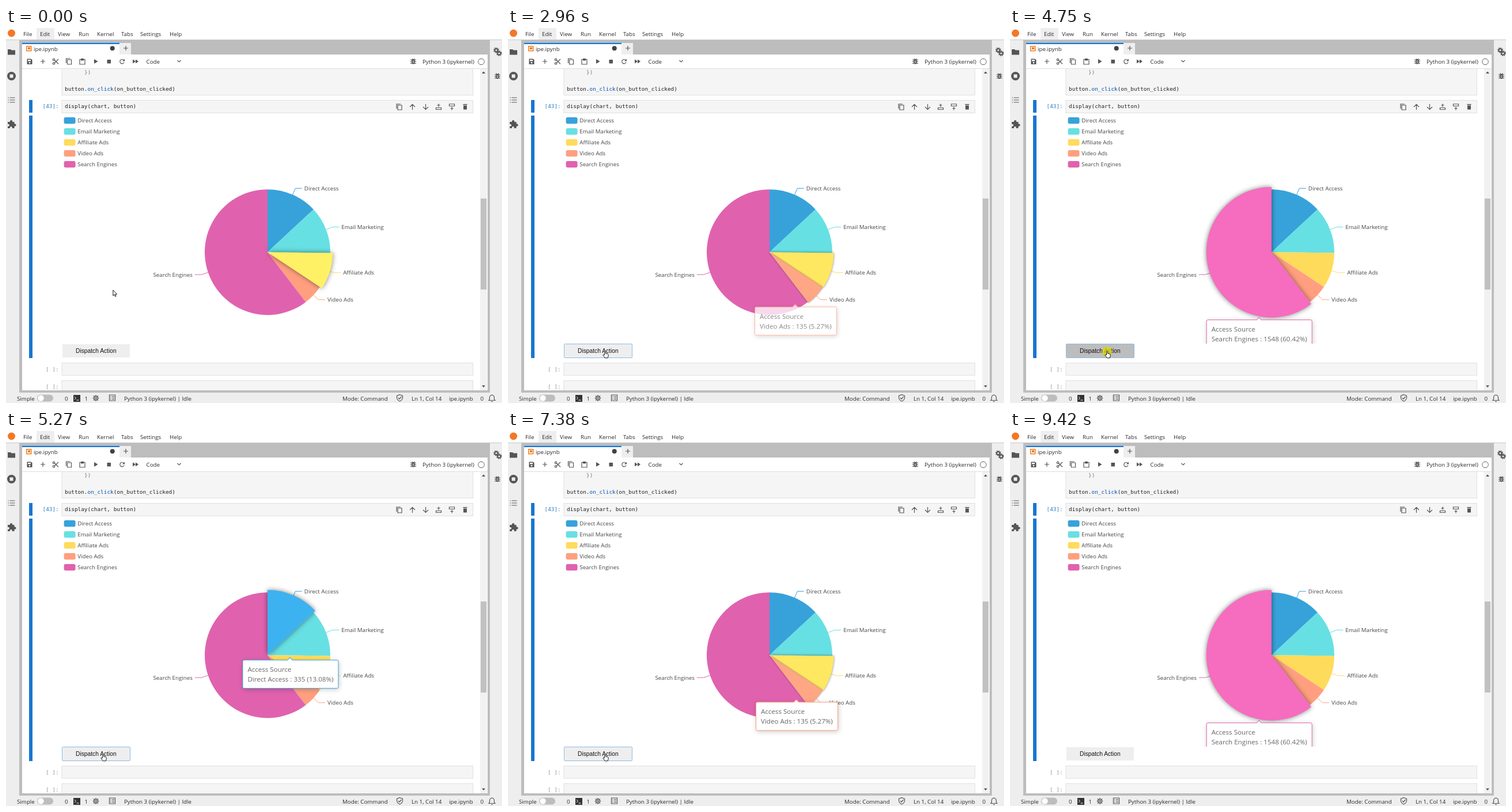
Animation, 861 px wide and 651 px high, one loop 9.52 s. Source, as an HTML page:

```html
<!DOCTYPE html>
<html lang="en">
<head>
<meta charset="utf-8">
<title>Notebook pie chart</title>
<style>
  html, body { margin: 0; width: 100%; height: 100%; overflow: hidden; background: #fff; }
  svg, #chart { position: absolute; left: 0; top: 0; width: 861px; height: 651px; }
  text { font: 9.75px "Open Sans", sans-serif; fill: #2b2b2b; white-space: pre; }
  .code { font: 9.4px "DejaVu Sans Mono", monospace; fill: #212121; }
  .prompt { fill: #307fc1; }
  .empty { fill: #9a9a9a; }
  .cell { fill: #f5f5f5; stroke: #e0e0e0; }
  .line { fill: none; stroke: #555; stroke-width: 1.2; }
  .solid { fill: #555; }
  .label { fill: #464646; }
  #buttonText { font: 10.25px "Liberation Sans", Arial, sans-serif; fill: #111; }
  #chart { clip-path: inset(148px 50px 103px 97px); }
  #tip {
    position: absolute; left: 0; top: 0; box-sizing: border-box; height: 50px; padding: 7px 8px;
    font: 11.6px/17px "Open Sans", sans-serif; color: #666; white-space: pre;
    background: #fff; border: 1px solid; border-radius: 3px; box-shadow: 1px 2px 8px rgba(0,0,0,.2);
  }
  #tip::before {
    content: ""; position: absolute; left: calc(50% - 4px); top: -4px; width: 6px; height: 6px;
    background: #fff; border: solid; border-width: 1px 0 0 1px; border-color: inherit; transform: rotate(45deg);
  }
</style>
</head>
<body>
<svg viewBox="0 0 861 651">
  <defs>
    <g id="bug"><ellipse class="solid" rx="3" ry="4.2"/><path class="line" d="M-5-3H5M-5 0H5M-5 3H5M-2.5-5.2L0-3 2.5-5.2"/><path d="M-1.3-1H1.3M-1.3 1.4H1.3" stroke="#fff"/></g>
    <g id="copy"><path class="line" d="M-4.5 3V-5H2.5M-2.5-3H4.5V5H-2.5Z"/></g>
    <g id="gear"><circle class="line" r="2.6" style="stroke-width:2"/><circle class="line" r="4.1" stroke-dasharray="1.6 1.62" style="stroke-width:1.6"/></g>
    <g id="list"><path class="line" d="M-3-4H6M-3 0H6M-3 4H6M-6-4h1.5M-6 0h1.5M-6 4h1.5"/></g>
    <clipPath id="page"><rect x="28" y="71" width="795" height="558"/></clipPath>
  </defs>

  <!-- window frame -->
  <path fill="#eee" d="M0 20H861V651H0ZM53 0H84V20H53Z"/>
  <path fill="#bdbdbd" d="M23 20H840V633H23Z"/>
  <path fill="#eee" d="M197 26H217V46H197Z"/>
  <path fill="#fff" d="M28 46H836V629H28Z"/>
  <path stroke="#c8c8c8" fill="none" d="M0 20.5H861"/>
  <path fill="#fff" d="M28 25H197V46H28Z"/>
  <path fill="#1976d2" d="M28 25.5H197V28H28Z"/>
  <path stroke="#ddd" d="M28 70.5H836"/>

  <!-- menu and tabs -->
  <circle cx="9.5" cy="9" r="6.5" fill="#f37726"/>
  <text x="30" y="13.5">File</text><text x="59" y="13.5">Edit</text><text x="90" y="13.5">View</text>
  <text x="126" y="13.5">Run</text><text x="158" y="13.5">Kernel</text><text x="200" y="13.5">Tabs</text>
  <text x="233" y="13.5">Settings</text><text x="284" y="13.5">Help</text>
  <rect x="35.7" y="31.7" width="8" height="8" fill="none" stroke="#ef6c00" stroke-width="1.3"/>
  <path fill="#ef6c00" d="M38 33.5H42V38L40 36.3 38 38Z"/>
  <text x="48" y="39.5">ipe.ipynb</text>
  <circle cx="184.7" cy="35.2" r="4" fill="#424242"/>
  <path class="line" d="M204 35H212M208 31V39"/>

  <!-- notebook toolbar -->
  <path class="solid" d="M36.5 53.5H43.5L45.5 55.5V63H36.5Z"/><path fill="#fff" d="M38 55H43V57.5H38Z"/><circle cx="41" cy="60.3" r="1.4" fill="#fff"/>
  <path class="line" d="M60 58H68M64 54V62"/>
  <g class="line"><path d="M84 55.5L91 62.5M84 61L91 54"/><circle cx="83" cy="55" r="1.7"/><circle cx="83" cy="61.5" r="1.7"/></g>
  <use href="#copy" x="109" y="58"/>
  <path class="line" d="M128 54.5H137V63H128Z"/><path class="solid" d="M130 53H135V56.5H130Z"/>
  <path class="solid" d="M153 54L159.5 58 153 62ZM175.5 55H182V61.5H175.5ZM220 54.5L225 58 220 61.5ZM225 54.5L230 58 225 61.5Z"/>
  <path class="line" d="M204.5 56A3.7 3.7 0 1 0 205 59.5"/><path class="solid" d="M206 53.5V57.5H202Z"/>
  <text x="243.5" y="62">Code</text>
  <path class="line" d="M297.5 56L300.5 59 303.5 56"/>
  <use href="#bug" x="707" y="58.5"/>
  <text x="723" y="62">Python 3 (ipykernel)</text>
  <circle id="kernel" cx="825" cy="58.5" r="5.3" fill="none" stroke="#616161"/>

  <!-- side bars -->
  <path class="solid" d="M3 37H8L9.5 38.5H16V46.5H3Z"/>
  <circle class="solid" cx="9.5" cy="83.5" r="7.5"/><path fill="#eee" d="M6.5 80.5H12.5V86.5H6.5Z"/>
  <use href="#list" x="9.5" y="125"/>
  <path class="solid" d="M3 163H7A2.2 2.2 0 1 1 11 163H14.5V166.5A2.2 2.2 0 1 1 14.5 170.5V174H10.5A2 2 0 1 0 7 174H3V170.5A2 2 0 1 0 3 167Z"/>
  <use href="#gear" x="851" y="38.5"/><use href="#gear" x="856" y="44"/>
  <use href="#bug" x="853" y="84"/>

  <!-- cells -->
  <g clip-path="url(#page)">
    <rect class="cell" x="97" y="60.5" width="713.5" height="56"/>
    <text class="code" x="136" y="80.2" style="fill:#777">})</text>
    <text class="code" x="102" y="109">button.<tspan fill="#0550ae">on_click</tspan>(on_button_clicked)</text>
    <path fill="#1976d2" d="M40 125H46V147H40ZM40 152H46V573H40Z"/>
    <text class="code prompt" x="63.5" y="139.2">[43]:</text>
    <rect class="cell" x="97" y="125.5" width="713.5" height="22"/>
    <text class="code" x="102" y="139.2">display(chart, button)</text>
    <text class="code empty" x="69" y="595.5">[ ]:</text>
    <rect class="cell" x="97" y="581.5" width="713.5" height="21.5"/>
    <text class="code empty" x="69" y="626">[ ]:</text>
    <rect class="cell" x="97" y="612" width="713.5" height="22"/>
  </g>
  <use href="#copy" x="682.5" y="137"/>
  <path class="line" d="M705.5 142V132.5M701 137L705.5 132.5 710 137M728.5 132V141.5M724 137L728.5 141.5 733 137"/>
  <path class="line" d="M746.5 138.5H755.5V141.5H746.5ZM751 137V131.5M748.5 134H753.5M769.5 132H778.5V135.5H769.5ZM774 137V142.5M771.5 139.5H776.5"/>
  <path class="solid" d="M793.5 132H800.5V133.5H793.5ZM794 134.5H800V141.5H794Z"/>

  <!-- scroll bar -->
  <path fill="#f1f1f1" d="M823 71H835V629H823Z"/><path fill="#c1c1c1" d="M824 296H834V454H824Z"/>
  <path fill="#505050" d="M826 79L829 75.5 832 79ZM826 620.5L829 624 832 620.5Z"/>

  <!-- status bar -->
  <text x="19" y="646.5">Simple</text>
  <rect x="54" y="636.5" width="28" height="12" rx="6" fill="#bdbdbd"/><circle cx="60.5" cy="642.5" r="5.2" fill="#fff"/>
  <text x="102" y="646.5">0</text>
  <path fill="#333" d="M117 637H129V649H117Z"/><path d="M119 640L121.5 642.5 119 645M122.5 646H126.5" fill="none" stroke="#fff"/>
  <text x="136.5" y="646.5">1</text>
  <g class="line"><circle cx="156" cy="642.5" r="3.6"/><path d="M154.5 641H157.5V644H154.5ZM156 637V639M156 646V648M150.5 642.5H152.5M159.5 642.5H161.5M152 638.5L153.5 640M160 638.5L158.5 640M152 646.5L153.5 645M160 646.5L158.5 645"/>
    <path d="M179.5 637H189.5V647H179.5ZM181 639.5H182.5M184 639.5H188M181 642H182.5M184 642H188M181 644.5H182.5M184 644.5H188"/>
    <path d="M683.5 636.5L688.5 638.5V642Q688 646 683.5 648 679 646 678.5 642V638.5ZM681 642L683 644 686.5 640"/>
    <path d="M838 646.5H849L847.5 644.5V641Q847 637.5 843.5 637 840 637.5 839.5 641V644.5ZM842 648.5H845"/></g>
  <text x="205" y="646.5">Python 3 (ipykernel) | <tspan id="status">Idle</tspan></text>
  <text x="584" y="646.5">Mode: Command</text><text x="704" y="646.5">Ln 1, Col 14</text>
  <text x="769" y="646.5">ipe.ipynb</text><text x="823.5" y="646.5">0</text>

  <rect id="button" x="97.5" y="548.5" width="118" height="24" rx="1"/>
  <text id="buttonText" x="121" y="563.5">Dispatch Action</text>
</svg>

<div id="chart">
  <svg viewBox="0 0 861 651"><g id="labels"></g><g id="pie"></g></svg>
  <div id="tip"></div>
</div>

<svg viewBox="0 0 861 651">
  <circle id="clickMark" cx="168.5" cy="562" r="8.5" fill="#dcd600"/>
  <g id="pointer" fill="#fff" stroke="#000" stroke-width=".9" stroke-linejoin="round">
    <path id="arrow" d="M.5.5V10.2L2.7 8.2 4.2 11.6 5.8 10.9 4.3 7.6H7.3Z"/>
    <path id="hand" d="M3.3 7.8V1.5A1 1 0 0 1 5.3 1.5V5L8.6 5.7Q9.8 6 9.8 7.2V9.5L8.8 12.8H4.2L1 8.7Q.3 7.4 1.5 7Z"/>
  </g>
</svg>

<script>
const LOOP = 9520, CX = 454, CY = 389.2, RADIUS = 109, GROW = 4.2, LEAD = 12;
const slices = [
  { name: 'Direct Access', value: 335, rgb: [55, 162, 218] },
  { name: 'Email Marketing', value: 310, rgb: [103, 224, 227] },
  { name: 'Affiliate Ads', value: 234, rgb: [255, 219, 92] },
  { name: 'Video Ads', value: 135, rgb: [255, 159, 127] },
  { name: 'Search Engines', value: 1548, rgb: [224, 98, 174] },
];
// Each click: press time, reply time, slice that gets highlighted.
const clicks = [
  [2710, 2910, 3], [3700, 3850, 4], [4750, 4900, 0], [5570, 5740, 1],
  [6440, 6600, 2], [7180, 7330, 3], [7700, 7850, 4],
].map(([press, reply, slice]) => ({ press, reply, slice }));
const path = [
  [0, 185.3, 454.5], [590, 185.3, 454.5], [1540, 170.3, 531], [1660, 175.5, 564], [1830, 175.5, 564],
  [1920, 169.5, 563], [2090, 169.5, 563], [2180, 164.3, 560], [8650, 164.3, 560], [9020, 757, 652], [LOOP, 757, 652],
];

const $ = id => document.getElementById(id);
const clamp = x => Math.min(1, Math.max(0, x));
const lerp = (a, b, k) => a + (b - a) * k;
const easeOut = (x, power) => 1 - (1 - clamp(x)) ** power;
const between = (t, from, to) => t >= from && t < to;
const css = (rgb, gain = 1) => `rgb(${rgb.map(c => Math.min(255, c * gain)).join()})`;
const polar = (angle, r) => [CX + r * Math.sin(angle), CY - r * Math.cos(angle)];

function make(parent, tag, attributes, text = '') {
  const node = document.createElementNS('http://www.w3.org/2000/svg', tag);
  for (const key in attributes) node.setAttribute(key, attributes[key]);
  node.textContent = text;
  return parent.appendChild(node);
}

function sector({ start, end }, r) {
  const large = end - start > Math.PI ? 1 : 0;
  return `M${CX} ${CY}L${polar(start, r)}A${r} ${r} 0 ${large} 1 ${polar(end, r)}Z`;
}

function fillTip({ name, value, rgb }) {
  const share = +(100 * value / total).toFixed(2);
  $('tip').textContent = `Access Source\n${name} : ${value} (${share}%)`;
  $('tip').style.borderColor = css(rgb);
}

const total = slices.reduce((sum, s) => sum + s.value, 0);
let turn = 0;
slices.forEach((s, i) => {
  s.start = turn;
  s.end = turn += s.value / total * 2 * Math.PI;
  const color = css(s.rgb), middle = (s.start + s.end) / 2, side = Math.sign(Math.sin(middle));
  const [x, y] = polar(middle, RADIUS + LEAD);

  make($('labels'), 'rect', { x: 100.6, y: 155, width: 20, height: 11.2, rx: 3, fill: color, transform: `translate(0 ${19 * i})` });
  make($('labels'), 'text', { class: 'label', x: 124.3, y: 164 + 19 * i }, s.name);
  make($('labels'), 'path', { d: `M${polar(middle, RADIUS)}L${x} ${y}h${side * 11.5}`, fill: 'none', stroke: color });
  make($('labels'), 'text', {
    class: 'label', x: x + side * 15.5, y: y + 3.4, 'text-anchor': side > 0 ? 'start' : 'end',
  }, s.name);

  s.node = make($('pie'), 'path', { d: sector(s, RADIUS) });
  const box = s.node.getBBox();
  fillTip(s);
  s.tipX = box.x + box.width / 2 - $('tip').offsetWidth / 2;
  s.tipY = box.y + box.height + 8;
});

function drawChart(t) {
  const done = clicks.filter(c => t >= c.reply);
  const order = [2, ...done.map(c => c.slice)];
  const active = slices[order.at(-1)], previous = slices[order.at(-2)];
  const age = done.length ? t - done.at(-1).reply : LOOP;
  const k = easeOut(age / 300, 3);

  for (const s of slices) {
    const level = s === active ? k : s === previous ? 1 - k : 0;
    s.node.setAttribute('d', sector(s, RADIUS + GROW * level));
    s.node.setAttribute('fill', css(s.rgb, 1 + .1 * level));
    s.node.style.filter = level ? `drop-shadow(0 0 ${4 * level}px rgba(0,0,0,.5))` : '';
  }
  if (previous) $('pie').append(previous.node);
  $('pie').append(active.node);

  const tip = $('tip');
  tip.style.visibility = done.length ? 'visible' : 'hidden';
  if (!done.length) return;
  const from = done.length > 1 ? previous : active, slide = easeOut(age / 400, 5);
  fillTip(active);
  tip.style.opacity = done.length > 1 ? 1 : easeOut(age / 200, 5);
  tip.style.transform = `translate(${lerp(from.tipX, active.tipX, slide)}px,${lerp(from.tipY, active.tipY, slide)}px)`;
}

function drawControls(t) {
  const pressed = clicks.find(c => between(t, c.press, c.press + 110));
  const hovered = between(t, 1570, 9420);
  $('button').setAttribute('fill', pressed ? '#bdbdbd' : '#eee');
  $('button').setAttribute('stroke', !hovered ? '#fff' : t < 2710 ? '#d0d0d0' : '#8dbbe3');
  $('clickMark').setAttribute('opacity', pressed ? .8 * (1 - ((t - pressed.press) / 110) ** 2) : 0);

  const busy = between(t, 2780, 2880) || between(t, 5640, 5740);
  $('kernel').setAttribute('fill', busy ? '#616161' : 'none');
  $('status').textContent = busy ? 'Busy' : 'Idle';
}

function drawPointer(t) {
  const i = path.findIndex(p => p[0] > t);
  const [t0, x0, y0] = path[i - 1], [t1, x1, y1] = path[i];
  const u = (t - t0) / (t1 - t0), k = u * u * (3 - 2 * u);
  const x = lerp(x0, x1, k), y = lerp(y0, y1, k);
  const overButton = between(x, 98, 215) && between(y, 548, 572);
  $('pointer').setAttribute('transform', `translate(${x} ${y})`);
  $('hand').style.display = overButton ? '' : 'none';
  $('arrow').style.display = overButton ? 'none' : '';
}

function draw() {
  const t = performance.now() % LOOP;
  drawChart(t);
  drawControls(t);
  drawPointer(t);
  requestAnimationFrame(draw);
}
draw();
</script>
</body>
</html>
```
